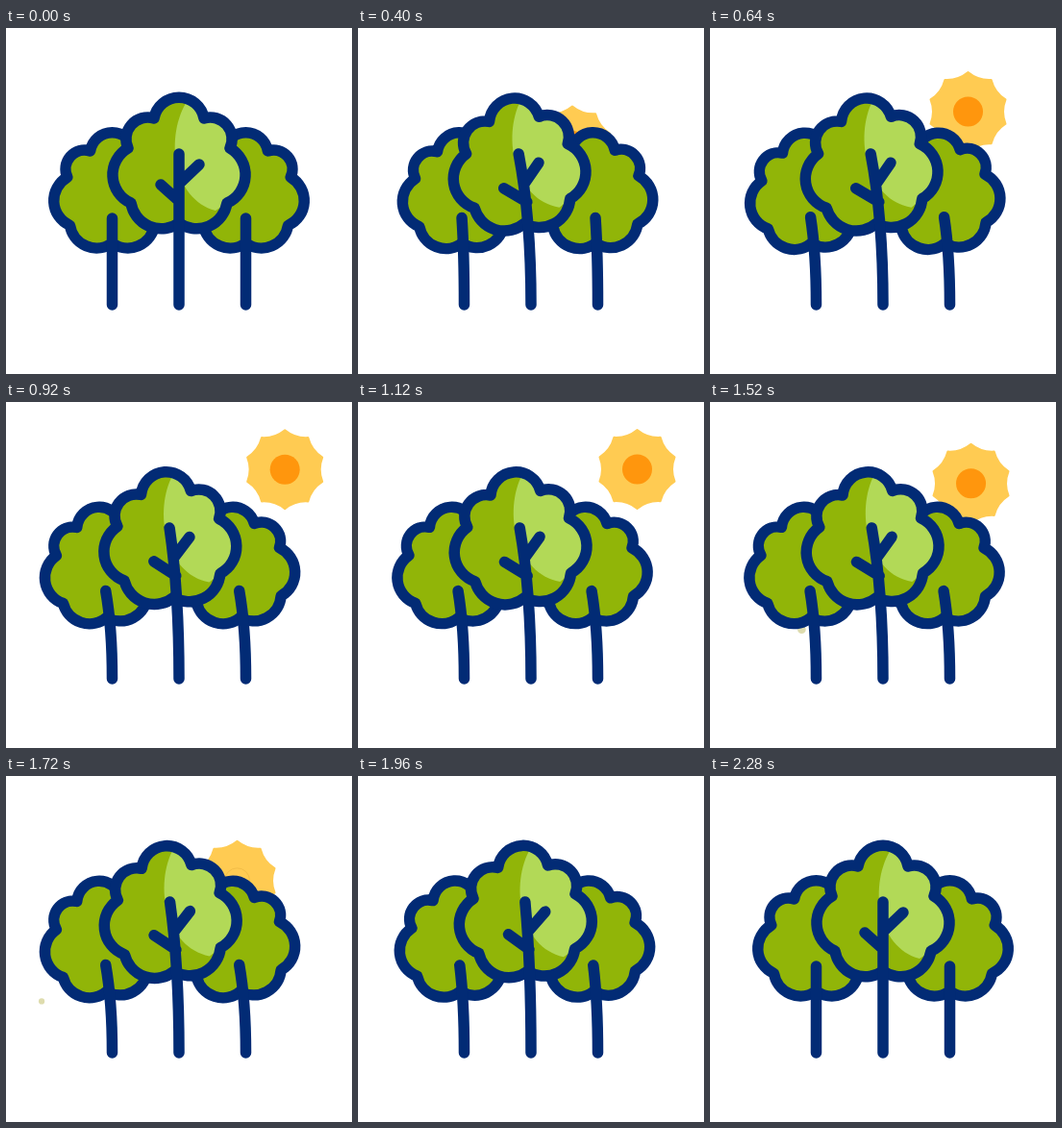
Animation of 360 by 360 pixels, one loop 2320 ms. Source, as an HTML page:

```html
<!DOCTYPE html>
<html lang="en">
<head>
<meta charset="utf-8">
<title>Trees and sun</title>
<style>
  html, body { margin: 0; height: 100%; overflow: hidden; background: #fff; }
  svg { display: block; width: 100vw; height: 100vh; }
  .line { fill: none; stroke: #022b75; stroke-width: 11.5; stroke-linecap: round; stroke-linejoin: round; }
  .leaf { fill: #91b508; }
  .shine { fill: #b2d957; }
  .small { stroke-width: 13; }
  #rays { fill: #ffcb52; stroke: #ffcb52; stroke-width: 2; stroke-linejoin: round; }
</style>
</head>
<body>
<svg viewBox="0 0 360 360">
  <defs>
    <path id="crown" d="M154 94A26.4 26.4 0 0 1 206 94A22.5 22.5 0 0 1 233 125A32 32 0 0 1 230 182A32 32 0 0 1 180 203A32 32 0 0 1 130 182A32 32 0 0 1 127 125A22.5 22.5 0 0 1 154 94Z"/>
  </defs>
  <g id="sun">
    <path id="rays"/>
    <circle r="13" fill="none" stroke="#f2bd48"/>
    <circle id="disc" r="15.5" fill="#ff960d"/>
  </g>
  <circle id="dot" fill="#dedcae"/>
  <g class="side" data-x="110.5"></g>
  <g class="side" data-x="249.5"></g>
  <g id="main">
    <use href="#crown" class="leaf"/>
    <path class="shine" d="M189 75C165 112 173 178 218 190L230 182A32 32 0 0 0 233 125A22.5 22.5 0 0 0 206 94A26.4 26.4 0 0 0 189 75Z"/>
    <use href="#crown" class="line"/>
  </g>
  <path id="trunk" class="line"/>
</svg>
<script>
const LOOP = 2320;
const $ = id => document.getElementById(id);

const progress = (t, from, to) => Math.min(1, Math.max(0, (t - from) / (to - from)));
const ease = (t, from, to) => {
  const u = progress(t, from, to);
  return u * u * (3 - 2 * u);
};
const wave = t => Math.cos((t - 520) / 800 * 2 * Math.PI);

// The wind leans the trees to the left, rocks them, then lets go
const mainSway = t => ease(t, 160, 400) * (1 - ease(t, 1640, 2280)) * (5.1 + 0.8 * wave(t));
const sideSway = t => ease(t, 160, 720) * (1 - ease(t, 1800, 2280)) * (4.75 - 0.25 * wave(t));

// 0 behind the trees, 1 high in the sky
const sunHeight = t => 1 - (1 - progress(t, 240, 960)) ** 2 - progress(t, 1200, 1980) ** 2;

function sunPath() {
  const at = (r, n) => {
    const a = n * Math.PI / 5;
    return `${r * Math.sin(a)} ${-r * Math.cos(a)}`;
  };
  let d = `M${at(41, 0)}`;
  for (let i = 1; i <= 10; i++) d += `Q${at(34, i - 0.5)} ${at(41, i)}`;
  return d + "Z";
}
$("rays").setAttribute("d", sunPath());

const sides = [...document.querySelectorAll(".side")].map(g => {
  const x = +g.dataset.x;
  g.innerHTML = `<g><g transform="translate(${x} 109) scale(.88) translate(-180 -72.5)">
    <use href="#crown" class="leaf"/><use href="#crown" class="line small"/></g></g>
    <path class="line"/>`;
  return { x, crown: g.firstElementChild, trunk: g.lastElementChild };
});

function drawMain(angle) {
  const s = angle / 6;
  $("main").setAttribute("transform", `rotate(${-angle} 180 275)`);
  $("trunk").setAttribute("d",
    `M180 288Q180 198 ${180 - 13.8 * s} 131` +
    `M${180 - 7.5 * s} 162L${201 - 14 * s} ${142 - 2 * s}` +
    `M${161 - 10 * s} ${163 + 4 * s}L${180 - 4.5 * s} ${180 + s}`);
}

function drawSides(angle) {
  const s = angle / 5;
  for (const { x, crown, trunk } of sides) {
    crown.setAttribute("transform", `rotate(${-angle} ${x} 288)`);
    trunk.setAttribute("d", `M${x} 288Q${x} 235 ${x - 6.8 * s} ${198 - 1.5 * s}`);
  }
}

function drawSun(t) {
  const h = sunHeight(t);
  $("sun").setAttribute("transform", `translate(${178.5 + 112 * h} ${157 - 87 * h})`);
  $("disc").setAttribute("opacity", 1 - ease(t, 1600, 1700));
}

function drawDot(t) {
  const u = progress(t, 1280, 1760);
  $("dot").setAttribute("cx", 165.7 - 140 * u);
  $("dot").setAttribute("cy", 239.5 - 5.5 * u);
  $("dot").setAttribute("r", u > 0 && u < 1 ? 5.7 - 2.8 * u : 0);
}

function tick() {
  const t = performance.now() % LOOP;
  drawMain(mainSway(t));
  drawSides(sideSway(t));
  drawSun(t);
  drawDot(t);
  requestAnimationFrame(tick);
}
tick();
</script>
</body>
</html>
```
